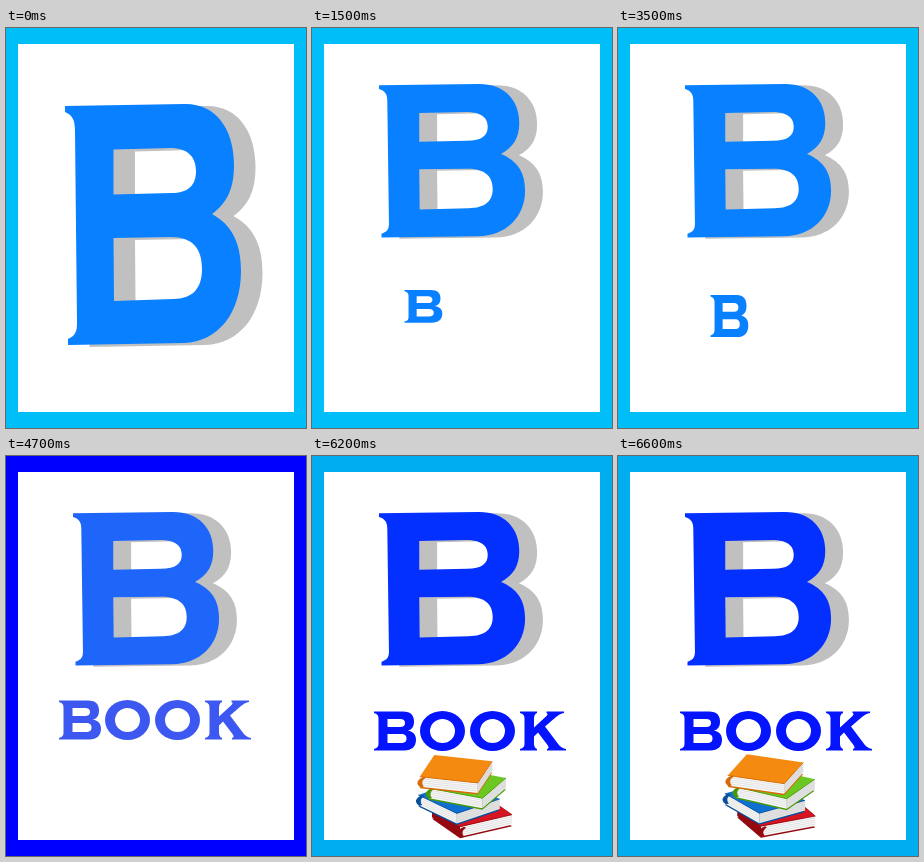
These frames come from a looping animation (300x400 px, 6800 ms). An HTML page:

```html
<!DOCTYPE html>
<html lang="en">
<head>
<meta charset="utf-8">
<title>B is for Book</title>
<style>
  html, body { margin: 0; width: 100%; height: 100%; overflow: hidden; background: #fff; }
  svg { display: block; width: 100vw; height: 100vh; }
</style>
</head>
<body>
<svg viewBox="0 0 300 400" role="img" aria-label="B, book">
  <defs>
    <path id="bigB" fill-rule="evenodd" d="M59 78 L178 76 C209 75 228 100 228 137 C228 161 221 175 206 186
      C226 197 235 215 235 243 C235 285 212 314 178 315 L62 317 V311 C69 308 71 304 71 295
      L69 103 C69 91 66 87 59 84 Z
      M107.500 121.500 L164 120 C183 120 190 130 190 143 C190 157 183 165 165 165 L107.500 166.500 Z
      M107.500 210 L165 209 C187 209 196 221 196 241 C196 260 187 271 167 271 L108 273 Z"/>
    <path id="B" fill-rule="evenodd" d="M0 0 H29 C37 0 40 4 40 10 C40 15 38 18 34 19 C39 20 42 23 42 28
      C42 35 38 39 30 39 H0 V37.500 C3.500 36.500 4.500 35 4.500 32 V7 C4.500 4 3.500 2.500 0 1.500 Z
      M13.500 7.500 H26 C29.500 7.500 31 9 31 11.500 C31 14 29.500 15.500 26 15.500 H13.500 Z
      M13.500 22.500 H27 C31 22.500 32.500 24 32.500 27 C32.500 30 31 31.500 27 31.500 H13.500 Z"/>
    <path id="O" fill-rule="evenodd" d="M0 19.500 A22.500 20 0 0 1 45 19.500 A22.500 20 0 0 1 0 19.500 Z
      M10 19.500 A12.500 12 0 0 0 35 19.500 A12.500 12 0 0 0 10 19.500 Z"/>
    <path id="K" d="M0 0 H17 V1.500 C15 2.500 14 4 14 7 V16 L26 5 C28 3 28 2 26.500 1.500 V0 H44 V1.500
      C41 2 39 3 36 5.500 L25 15 L37 31 C40 35 42 37 46 37.500 V39 H27 V37.500 C29 37 29 36 27.500 33.500
      L18 21 L14 25 V32 C14 35 15 36.500 17 37.500 V39 H0 V37.500 C3.500 36.500 4.500 35 4.500 32 V7
      C4.500 4 3.500 2.500 0 1.500 Z"/>
  </defs>
  <rect id="border" width="300" height="400"/>
  <rect x="12" y="16" width="276" height="368" fill="#fff"/>
  <g id="letter">
    <use href="#bigB" x="21.500" y="2" fill="#c0c0c0"/>
    <use id="face" href="#bigB"/>
  </g>
  <use id="small" href="#B"/>
  <g id="word">
    <use href="#B"/>
    <use href="#O" x="46"/>
    <use href="#O" x="96"/>
    <use href="#K" x="146"/>
  </g>
  <g id="books"></g>
</svg>
<script>
const LOOP = 6800;
const $ = id => document.getElementById(id);
const show = (id, on) => $(id).setAttribute("display", on ? "inline" : "none");

const SKY = "#00bff8", CYAN = "#00aef0", BLUE = "#0880ff", DEEP = "#0430ff";
const WHOLE = "", SQUASHED = "translate(67 56) scale(.83 .637) translate(-59 -76)";

// top to bottom; yaw in degrees
const BOOKS = [
  { color: "#f58a10", edge: "#d46a08", x: 144, yaw: 15 },
  { color: "#6cc820", edge: "#48980c", x: 155, yaw: 25 },
  { color: "#1070d0", edge: "#08509c", x: 147, yaw: 50 },
  { color: "#d81420", edge: "#940810", x: 160, yaw: -30 }
];
const HALF_LENGTH = 30, HALF_WIDTH = 28, THICK = 10, FLATTEN = .4;

const SCENES = [
  { at: 0, border: SKY, face: BLUE, pose: WHOLE },
  { at: 1500, border: SKY, face: BLUE, pose: SQUASHED, small: { y: 262, stretch: .84 } },
  { at: 3500, border: SKY, face: BLUE, pose: SQUASHED, small: { y: 267, stretch: 1.08 } },
  { at: 4700, border: "#0000ff", face: "#1e66fa", pose: SQUASHED, word: { x: 53, y: 244.5, fill: "#3c58f0" } },
  ...[0, 20, 5].map((turn, i) => ({
    at: 6200 + i * 200, border: CYAN, face: DEEP, pose: SQUASHED,
    word: { x: 62, y: 255.5, fill: "#0414ff" }, turn
  }))
];

const poly = (pts, fill) => `<polygon points="${pts.join(" ")}" fill="${fill}"/>`;
const drop = ([x, y], h) => [x, y + h];

// one vertical side of a book, with page lines unless it is the spine
function side(p, q, fill, lined) {
  let out = poly([p, q, drop(q, THICK), drop(p, THICK)], fill);
  for (let k = 2; lined && k < THICK; k += 2) {
    out += `<path d="M${drop(p, k)}L${drop(q, k)}" stroke="#ccc" stroke-width=".5"/>`;
  }
  return out;
}

function spineEnd([x, y]) {
  return `<path d="M${x + 4} ${y}Q${x - 7} ${y + THICK / 2} ${x + 1} ${y + THICK + 1}
    L${x + 4} ${y + THICK}Q${x} ${y + THICK / 2} ${x + 6} ${y + 1}Z"`;
}

function book({ color, edge, x, yaw }, i, turn) {
  const angle = (yaw + turn) * Math.PI / 180;
  const cos = Math.cos(angle), sin = Math.sin(angle);
  const cx = x + turn * (.7 - .35 * i), cy = 313 + 14 * i;
  const corner = (l, w) => [
    cx + l * HALF_LENGTH * cos - w * HALF_WIDTH * sin,
    cy + FLATTEN * (l * HALF_LENGTH * sin + w * HALF_WIDTH * cos)
  ];
  const back = corner(-1, -1), right = corner(1, -1), near = corner(1, 1), left = corner(-1, 1);
  const cover = [back, right, near, left];
  let out = poly(cover.map(p => drop(p, THICK + 1.5)), edge);
  out += side(left, near, "#f8f8f8", true);
  out += sin > 0 ? side(near, right, "#e4e4e4", true) : side(back, left, edge, false);
  out += poly(cover, color);
  out += `<path d="M${left}L${near}L${right}" stroke="${edge}" stroke-width=".8" fill="none"/>`;
  return out + spineEnd(left) + ` fill="${edge}"/>`;
}

const stack = turn => BOOKS.map((b, i) => book(b, i, turn)).reverse().join("");

let current;

function draw(time) {
  const t = time % LOOP;
  const scene = SCENES.filter(s => s.at <= t).pop();
  if (scene === current) return;
  current = scene;
  const { border, face, pose, small, word, turn } = scene;
  $("border").setAttribute("fill", border);
  $("face").setAttribute("fill", face);
  $("letter").setAttribute("transform", pose);
  show("small", small);
  if (small) {
    $("small").setAttribute("fill", BLUE);
    $("small").setAttribute("transform", `translate(92.5 ${small.y}) scale(.9 ${small.stretch})`);
  }
  show("word", word);
  if (word) {
    $("word").setAttribute("transform", `translate(${word.x} ${word.y})`);
    $("word").setAttribute("fill", word.fill);
  }
  $("books").innerHTML = turn === undefined ? "" : stack(turn);
}

const start = performance.now();
function tick() {
  draw(performance.now() - start);
  requestAnimationFrame(tick);
}
tick();
</script>
</body>
</html>
```
